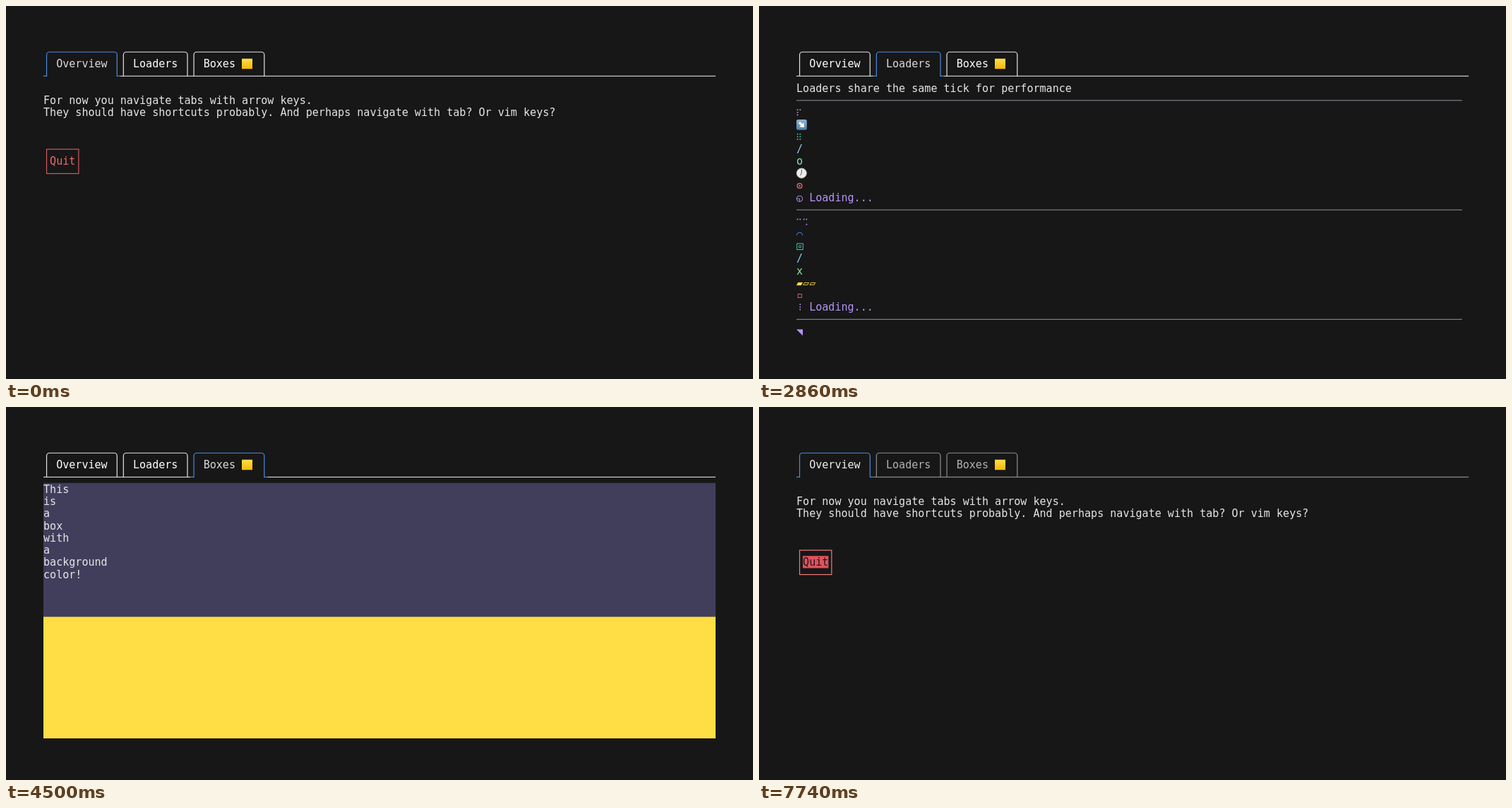
These frames come from a looping animation (1058 by 529 pixels, 8 s). An HTML page with a canvas:

```html
<!DOCTYPE html>
<html lang="en">
<head>
<meta charset="utf-8">
<title>Terminal tabs</title>
<style>
html, body { margin: 0; width: 100%; height: 100%; overflow: hidden; background: #171717; }
canvas { display: block; }
</style>
</head>
<body>
<canvas id="stage" width="1058" height="529"></canvas>
<script>
const g = document.getElementById('stage').getContext('2d');
const BG = '#171717', TEXT = '#e6e6e6', BLUE = '#4a8be0', PURPLE = '#b594f7',
  TEAL = '#3fc4a8', CYAN = '#8ccbf3', GREEN = '#84e6a4', YELLOW = '#ffdd44', RED = '#f0696f';

// Terminal grid: 105 columns by 24 rows
const CW = 952 / 105, RH = 17.25;
const X = col => 53 + CW * col;
const Y = row => 56 + RH * row;
const mid = row => Y(row + .5);

function text(str, col, row, color = TEXT) {
  g.fillStyle = color;
  [...str].forEach((ch, i) => g.fillText(ch, X(col + i), Y(row) + 14.2));
}

function rect(x, y, w, h, color) {
  g.fillStyle = color;
  g.fillRect(x, y, w, h);
}

function circle(x, y, r) {
  g.beginPath();
  g.arc(x, y, r, 0, Math.PI * 2);
}

const rule = (row, cols, color) => rect(53, mid(row) - .3, CW * cols, 1.2, color);

function gradient(y, h, from, to) {
  const fill = g.createLinearGradient(0, y, 0, y + h);
  fill.addColorStop(0, from);
  fill.addColorStop(1, to);
  return fill;
}

// Tabs: label, first and last column
const TABS = [['Overview', 0, 11], ['Loaders', 12, 22], ['Boxes', 23, 34]];

function tabBorder([, a, b], color, active) {
  const l = X(a + .5), r = X(b + .5), top = mid(0) + .6, base = mid(2) + .3;
  if (active) rect(X(a), base - 2, X(b + 1) - X(a), 4, BG);
  g.strokeStyle = color;
  g.lineWidth = 1.2;
  g.beginPath();
  if (active) g.moveTo(X(a), base);
  g.lineTo(l, base);
  g.arcTo(l, top, r, top, 4);
  g.arcTo(r, top, r, base, 4);
  g.lineTo(r, base);
  if (active) g.lineTo(X(b + 1), base);
  g.stroke();
}

function tabs(active, focused) {
  const edge = focused ? '#e4e4e4' : '#8e8e8e';
  rule(2, 105, focused ? '#cfcfcf' : '#8e8e8e');
  TABS.forEach((tab, i) => {
    const on = i === active;
    tabBorder(tab, on ? BLUE : edge, on);
    text(tab[0], tab[1] + 2, 1, on ? (focused ? '#dadada' : '#efefef') : focused ? '#fff' : '#b2b2b2');
  });
  rect(334, 74.7, 15, 14.5, gradient(74, 15, '#ffe04a', '#f6b90c'));
}

function overview(quitFocused) {
  tabs(0, !quitFocused);
  text('For now you navigate tabs with arrow keys.', 0, 4);
  text('They should have shortcuts probably. And perhaps navigate with tab? Or vim keys?', 0, 5);
  g.strokeStyle = quitFocused ? '#f0797d' : '#d0585e';
  g.lineWidth = 1.2;
  g.strokeRect(X(.5), mid(8) + .5, CW * 5, RH * 2);
  if (quitFocused) rect(X(1), Y(9), CW * 4, RH, '#e2525c');
  text('Quit', 1, 9, quitFocused ? BG : RED);
}

function boxes() {
  tabs(2, true);
  rect(53, Y(3), 952, RH * 11, '#413e5c');
  rect(53, Y(14), 952, RH * 10, YELLOW);
  'This is a box with a background color!'.split(' ').forEach((word, i) => text(word, 0, 3 + i));
}

// Glyphs that are drawn rather than typed
function braille(ch, col, row, color) {
  const bits = ch.codePointAt(0) - 0x2800;
  const spots = [[0, 0], [0, 1], [0, 2], [1, 0], [1, 1], [1, 2], [0, 3], [1, 3]];
  g.fillStyle = color;
  spots.forEach(([x, y], i) => {
    if (!(bits >> i & 1)) return;
    circle(X(col) + 1.6 + x * 3.7, mid(row) - 3.6 + y * 3.6, .95);
    g.fill();
  });
}

function arrow(step, row) {
  const y = mid(row);
  g.fillStyle = gradient(y - 7, 15, '#8db3cf', '#507fa8');
  g.beginPath();
  g.roundRect(53, y - 7.1, 14.8, 14.8, 2.5);
  g.fill();
  g.save();
  g.translate(60.4, y + .3);
  g.rotate(step * Math.PI / 4);
  g.fillStyle = '#fff';
  g.beginPath();
  [[0, -5], [4.5, 0], [1.6, 0], [1.6, 4.7], [-1.6, 4.7], [-1.6, 0], [-4.5, 0]].forEach(p => g.lineTo(...p));
  g.fill();
  g.restore();
}

function clock(hour, row) {
  const x = 60.3, y = mid(row), a = hour * Math.PI / 6;
  circle(x, y, 7);
  g.fillStyle = '#ececec';
  g.fill();
  g.strokeStyle = '#b9b9b9';
  g.lineWidth = .9;
  g.stroke();
  g.strokeStyle = '#444';
  g.beginPath();
  g.moveTo(x, y - 5);
  g.lineTo(x, y);
  g.lineTo(x + 3.7 * Math.sin(a), y - 3.7 * Math.cos(a));
  g.stroke();
}

function boxed(ch, row, color) {
  const x = 58, y = mid(row) + .6;
  g.strokeStyle = color;
  g.lineWidth = 1;
  g.strokeRect(x - 4.3, y - 4.3, 8.6, 8.6);
  if (ch === '⧇') {
    circle(x, y, 1.7);
  } else {
    g.beginPath();
    for (let i = 0; i < 5; i++) {
      const a = i * Math.PI * .4;
      g.moveTo(x, y);
      g.lineTo(x + 2.8 * Math.sin(a), y - 2.8 * Math.cos(a));
    }
  }
  g.stroke();
}

function target(row, color) {
  const x = X(.5), y = mid(row) + .6;
  circle(x, y, 3.4);
  g.strokeStyle = color;
  g.lineWidth = 1.3;
  g.stroke();
  circle(x, y, 1.2);
  g.fillStyle = color;
  g.fill();
}

function glyphs(str, row, color) {
  [...str].forEach((ch, i) => {
    if (ch >= '\u2800' && ch <= '\u28ff') braille(ch, i, row, color);
    else if (ch === '⧇' || ch === '⧆') boxed(ch, row, color);
    else if (ch === '⊙') target(row, color);
    else if (ch === '-') rect(53.6, mid(row) - .7, 7.6, 1.5, color);
    else text(ch, i, row, color);
  });
}

// Typed spinners: row, colour, frames
const SPINNERS = [
  [5, PURPLE, [...'⠋⠙⠹⠸⠼⠴⠦⠧⠇⠏']],
  [7, TEAL, [...'⣼⣹⢻⠿⡟⣏⣧⣶']],
  [8, CYAN, [...'-\\|/']],
  [9, GREEN, [...'.oO°Oo.']],
  [11, RED, [...'◡⊙◠']],
  [12, PURPLE, [...'◴◷◶◵']],
  [14, PURPLE, ('⢀⠀ ⡀⠀ ⠄⠀ ⢂⠀ ⡂⠀ ⠅⠀ ⢃⠀ ⡃⠀ ⠍⠀ ⢋⠀ ⡋⠀ ⠍⠁ ⢋⠁ ⡋⠁ ⠍⠉ ⠋⠉ ⠋⠉ ⠉⠙ ⠉⠙ ⠉⠩ ' +
    '⠈⢙ ⠈⡙ ⢈⠩ ⡀⢙ ⠄⡙ ⢂⠩ ⡂⢘ ⠅⡘ ⢃⠨ ⡃⢐ ⠍⡐ ⢋⠠ ⡋⢀ ⠍⡁ ⢋⠁ ⡋⠁ ⠍⠉ ⠋⠉ ⠋⠉ ⠉⠙ ⠉⠙').split(' ')],
  [15, BLUE, [...'◜◠◝◞◡◟']],
  [16, TEAL, [...'⧇⧆⧆⧇']],
  [17, CYAN, [...'-\\|/']],
  [18, GREEN, [...'+x*']],
  [19, YELLOW, '▱▱▱ ▰▱▱ ▰▰▱ ▰▰▰ ▰▰▱ ▰▱▱'.split(' ')],
  [20, RED, [...'▫▪▪▫']],
  [21, PURPLE, [...'⠄⠆⠇⠋⠙⠸⠰⠠⠰⠸⠙⠋⠇⠆']],
  [23, PURPLE, [...'◢◣◤◥']]
];

function loaders(tick) {
  tabs(1, true);
  text('Loaders share the same tick for performance', 0, 3);
  [4, 13, 22].forEach(row => rule(row, 104, '#7f7d88'));
  SPINNERS.forEach(([row, color, frames]) => glyphs(frames[tick % frames.length], row, color));
  arrow(tick % 8, 6);
  clock(tick % 12, 10);
  [12, 21].forEach(row => text('Loading...', 2, row, PURPLE));
}

// An 80 ms tick that now and then comes 40 ms early
function firstTick(t) {
  const early = [1820, 2980, 3900].filter(at => t >= at).length;
  return Math.floor((t - 1380 + 40 * early) / 80);
}

function draw() {
  const t = performance.now() % 8000;
  rect(0, 0, 1058, 529, BG);
  g.font = '15.06px "DejaVu Sans Mono", monospace';
  if (t < 1380) overview(t >= 500 && t < 940);
  else if (t < 4500) loaders(firstTick(t));
  else if (t < 6100) boxes();
  else if (t < 6900) loaders(Math.floor((t - 6100) / 80));
  else overview(t >= 7740);
  requestAnimationFrame(draw);
}
draw();
</script>
</body>
</html>
```
